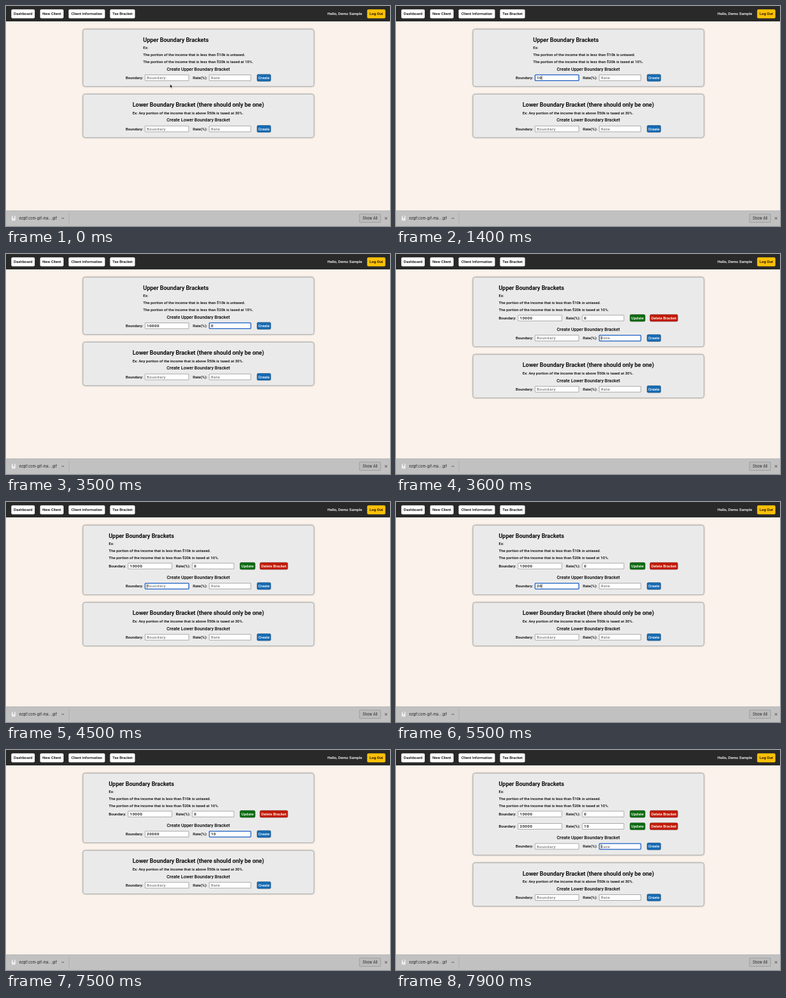
Write an HTML page that moves like this. It is 600 px wide and 343 px high and loops after 8 s.

```html
<!DOCTYPE html>
<html lang="en">
<head>
<meta charset="utf-8">
<title>Tax brackets</title>
<style>
  html, body { margin: 0; width: 100%; height: 100%; overflow: hidden; }
  svg { display: block; width: 600px; height: 343px; background: #faf2eb; }
  text { font: 500 6px Roboto, sans-serif; white-space: pre; }
  .h2 { font-size: 9px; stroke: #000; stroke-width: .12; }
  .h3 { font-size: 7.02px; }
  .field { font-size: 6.2px; letter-spacing: .417px; }
  .system { font: 400 5.6px Inter, sans-serif; }
  .card { filter: drop-shadow(0 .6px 1px #0005); }
</style>
</head>
<body>
<svg id="stage" viewBox="0 0 600 343"></svg>
<script>
const LOOP = 8000, ROW = 19.2, BLINK = 500;

// [time, saved rows, focused field, boundary, rate]
const events = [
  [0, 0, '', '', ''],
  [500, 0, 'boundary', '', ''],
  [1200, 0, 'boundary', '1', ''],
  [1400, 0, 'boundary', '10', ''],
  [1700, 0, 'boundary', '100', ''],
  [1900, 0, 'boundary', '1000', ''],
  [2100, 0, 'boundary', '10000', ''],
  [2400, 0, 'rate', '10000', ''],
  [3000, 0, 'rate', '10000', '0'],
  [3600, 1, 'rate', '', ''],
  [4500, 1, 'boundary', '', ''],
  [5200, 1, 'boundary', '2', ''],
  [5400, 1, 'boundary', '20', ''],
  [5700, 1, 'boundary', '200', ''],
  [6000, 1, 'boundary', '2000', ''],
  [6200, 1, 'boundary', '20000', ''],
  [6600, 1, 'rate', '20000', ''],
  [6900, 1, 'rate', '20000', '1'],
  [7000, 1, 'rate', '20000', '10'],
  [7600, 2, 'rate', '', '']
];
const saved = [['10000', '0'], ['20000', '10']];

const text = (x, y, str, cls = '', fill = '#000', anchor = 'start') =>
  `<text x="${x}" y="${y}" class="${cls}" fill="${fill}" text-anchor="${anchor}">${str}</text>`;
const box = (x, y, w, h, r, fill, extra = '') =>
  `<rect x="${x}" y="${y}" width="${w}" height="${h}" rx="${r}" fill="${fill}" ${extra}/>`;
const line = (d, color, width) =>
  `<path d="${d}" fill="none" stroke="${color}" stroke-width="${width}"/>`;

const button = (x, y, w, h, label, fill, color, extra) =>
  box(x, y, w, h, 2, fill, extra) + text(x + w / 2, y + h / 2 + 2.1, label, '', color, 'middle');

const action = (x, cy, w, label, fill) =>
  button(x, cy - 5.5, w, 11, label, fill, '#fff', 'stroke="#0006" stroke-width=".6"');

const card = (y, h) =>
  box(120.3, y, 360.8, h, 3.5, '#eaeaea', 'class="card" stroke="#a5a8a5" stroke-width=".8"');

function input(x, cy, w, value, hint, focused, caret) {
  const border = focused ? 'stroke="#1d5fc4" stroke-width="1.3"' : 'stroke="#777" stroke-width=".6"';
  const caretX = x + 2.9 + value.length * 3.9;
  return box(x, cy - 4.5, w, 9, focused ? 1 : .5, '#fff', border) +
    text(x + 2.7, cy + 2.2, value || hint, 'field', value ? '#000' : '#757575') +
    (focused && caret ? line(`M${caretX} ${cy - 3.2}v6.4`, '#000', .6) : '');
}

function fields(x, cy, boundary = '', rate = '', focus = '', caret = false) {
  return text(x, cy + 2.1, 'Boundary:') +
    input(x + 30.3, cy, 68.4, boundary, 'Boundary', focus === 'boundary', caret) +
    text(x + 105, cy + 2.1, 'Rate(%):') +
    input(x + 130.6, cy, 65, rate, 'Rate', focus === 'rate', caret);
}

const createForm = (kind, y, ...state) =>
  text(300.5, y, `Create ${kind} Boundary Bracket`, 'h3', '#000', 'middle') +
  fields(187, y + 11.2, ...state) + action(392.2, y + 11.2, 21.6, 'Create', '#176bb3');

const savedRow = ([boundary, rate], i) => {
  const cy = 99.8 + i * ROW;
  return fields(160.5, cy, boundary, rate) +
    action(365.5, cy, 23.8, 'Update', '#0d6b10') +
    action(396.7, cy, 43.6, 'Delete Bracket', '#c21c08');
};

const navBar = box(0, 0, 600, 24, 0, '#292929') +
  [[8.3, 36.6, 'Dashboard'], [53.3, 36.6, 'New Client'],
   [97.8, 56.8, 'Client Information'], [162.5, 39, 'Tax Bracket']]
    .map(([x, w, label]) => button(x, 5.3, w, 14, label, '#fff', '#000')).join('') +
  text(556.5, 14.3, 'Hello, Demo Sample', '', '#fff', 'end') +
  button(564.3, 5.3, 28.5, 14, 'Log Out', '#ffc107', '#000');

const downloadBar = box(0, 319, 600, 24, 0, '#c1c1c1') + line('M0 319.2H600', '#a3a3a3', .6) +
  box(9, 327.5, 5.6, 7, .5, '#f5f5f5') + text(11.8, 333, '?', 'system', '#555', 'middle') +
  text(20.5, 333.2, 'ezgif.com-gif-ma....gif', 'system', '#222') +
  line('M86.8 332l2-2 2 2', '#444', .8) + line('M98.5 321.5v19', '#a3a3a3', .6) +
  box(552.2, 324.3, 33.2, 13.2, 1.5, '#bababa', 'stroke="#8e8e8e" stroke-width=".6"') +
  text(568.8, 333, 'Show All', 'system', '#222', 'middle') +
  line('M591.9 329.2l3.6 3.6m0-3.6l-3.6 3.6', '#333', .8);

function pointer(t) {
  if (t >= 1200) return '';
  const y = 122 - 10 * Math.min(1, Math.max(0, (t - 50) / 350));
  if (y < 116) return line(`M255.8 ${y - 3}h2.4m-1.2 0v6m-1.2 0h2.4`, '#333', .6);
  return `<path transform="translate(256.4 ${y})" d="M0 0v5.6l1.3-1.2 .9 2 .9-.4-.9-2h1.8z"
    fill="#000" stroke="#fff" stroke-width=".4"/>`;
}

function scene(t) {
  const [since, rows, focus, boundary, rate] = events.findLast(e => e[0] <= t);
  const caret = Math.floor((t - since) / BLINK) % 2 === 0;
  const shift = rows * ROW, left = rows ? 160.5 : 214.3;
  return navBar +
    card(36.2, 89.2 + shift) +
    text(left, 55.7, 'Upper Boundary Brackets', 'h2') +
    text(left, 67, 'Ex:') +
    text(left, 77.7, 'The portion of the income that is less than $10k is untaxed.') +
    text(left, 88.5, 'The portion of the income that is less than $20k is taxed at 10%.') +
    saved.slice(0, rows).map(savedRow).join('') +
    createForm('Upper', 100.7 + shift, boundary, rate, focus, caret) +
    `<g transform="translate(0 ${shift})">` +
    card(137.5, 67.6) +
    text(197.7, 157.2, 'Lower Boundary Bracket (there should only be one)', 'h2') +
    text(197.7, 168.5, 'Ex: Any portion of the income that is above $50k is taxed at 30%.') +
    createForm('Lower', 180.4) + '</g>' +
    downloadBar + pointer(t);
}

const stage = document.getElementById('stage');
let shown = '';
function draw() {
  const next = scene(performance.now() % LOOP);
  if (next !== shown) stage.innerHTML = shown = next;
  requestAnimationFrame(draw);
}
draw();
</script>
</body>
</html>
```
